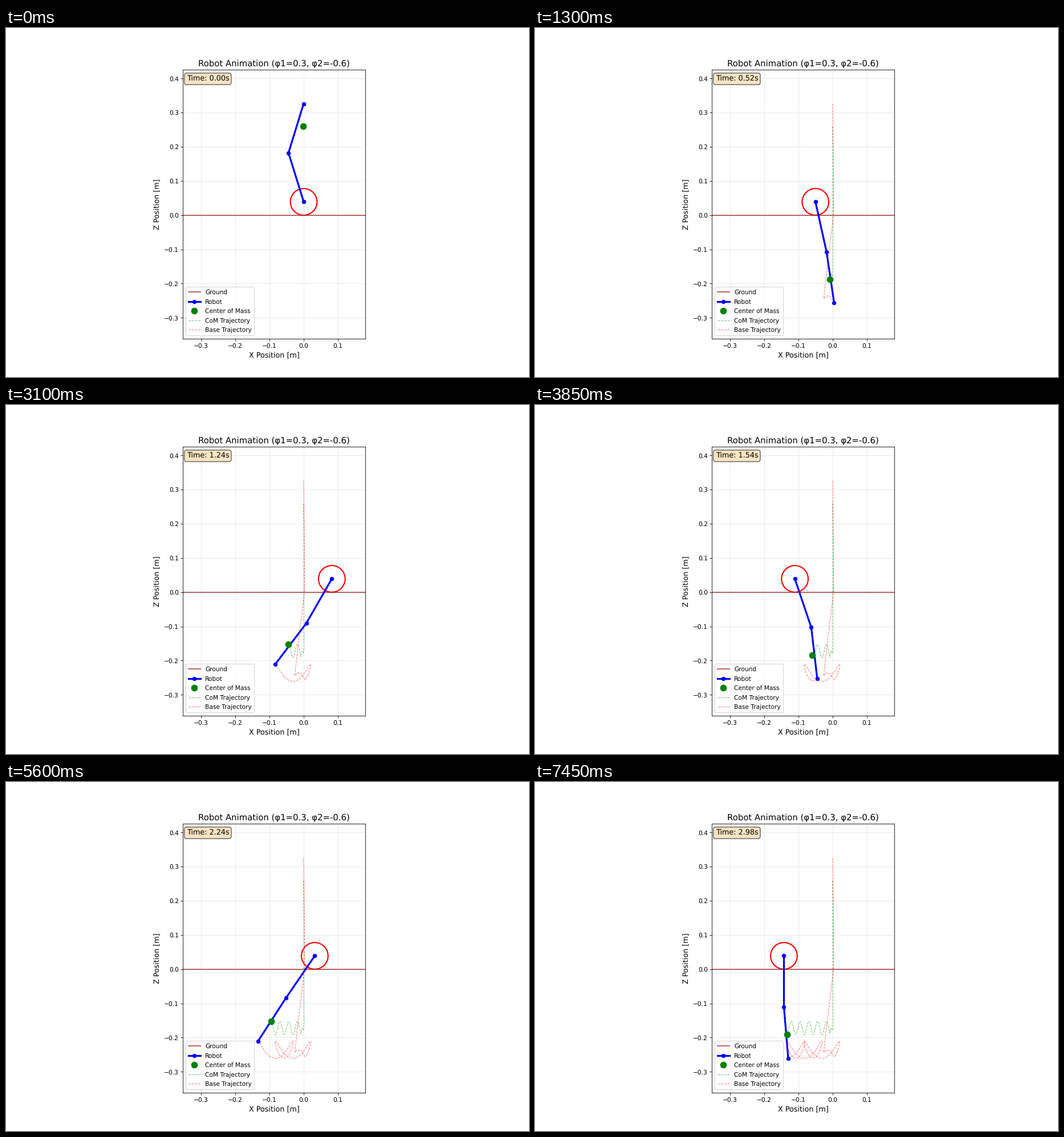
Recreate the animation shown at these times as a matplotlib script. Size 917 by 611 pixels, loop 7.5 s.

```python
import numpy as np
import matplotlib.pyplot as plt
from matplotlib.animation import FuncAnimation

plt.rcParams['text.hinting'] = 'none'

DPI = 611 / 8
N, DT = 150, 0.02
LINK, RADIUS = 0.15, 0.039
W_WHEEL, W_KNEE, W_BASE = 0.22, 0.02, 0.76   # mass shares
T_TAUT, T_WHIP, T_SWING = 0.34, 0.38, 0.52   # legs taut, knee flips, steady swing
DRIFT = -0.0508


def com_x(t):
    if t < T_TAUT:
        return -0.0008 + 0.002 * t / T_TAUT
    return 0.0012 + DRIFT * (t - T_TAUT)


def fall_base(t):
    """Base drops past the wheel, then rebounds as the legs go taut."""
    if t <= T_TAUT:
        z = 0.3256 - 0.5 * 9.48 * t * t
        x = np.interp(z, [-0.2226, -0.112, 0, 0.164, 0.3256],
                      [-0.0235, -0.011, 0.003, 0.003, 0])
        return np.array([x, z])
    keys = [T_TAUT, T_WHIP, 0.42, 0.46, T_SWING]
    x = np.interp(t, keys, [-0.0235, -0.0262, -0.018, -0.0075, 0.0035])
    z = np.interp(t, keys, [-0.2226, -0.244, -0.2365, -0.2365, -0.2567])
    return np.array([x, z])


def knee_between(wheel, base, side):
    """Knee of two equal links, bulging left (side -1) or right (side 1)."""
    dx, dz = base - wheel
    dist = max(np.hypot(dx, dz), 1e-6)
    bulge = np.sqrt(max(LINK ** 2 - dist ** 2 / 4, 0))
    normal = np.array([-dz, dx]) / dist
    if normal[0] * side < 0:
        normal = -normal
    return (wheel + base) / 2 + bulge * normal


def fall_pose(t):
    base = fall_base(t)
    side = -1 if t < T_WHIP - 1e-9 else 1
    wheel = np.array([0.0, RADIUS])
    for _ in range(30):
        knee = knee_between(wheel, base, side)
        wheel[0] = (com_x(t) - W_BASE * base[0] - W_KNEE * knee[0]) / W_WHEEL
    return wheel, knee, base


def swing_pose(t):
    theta = 0.588 * np.cos(6.2275 * (t - 0.7214))
    bend = np.interp(t, [0.52, 0.92, 1.54, 1.96, 2.52, 2.98],
                     [-0.035, -0.02, -0.105, -0.015, 0.04, 0.042])
    a, b = theta - bend, theta + bend
    knee = LINK * np.array([np.sin(a), -np.cos(a)])
    base = knee + LINK * np.array([np.sin(b), -np.cos(b)])
    wheel = np.array([com_x(t) - W_KNEE * knee[0] - W_BASE * base[0], RADIUS])
    return wheel, wheel + knee, wheel + base


def pose(t):
    return fall_pose(t) if t < T_SWING - 1e-9 else swing_pose(t)


joints = np.array([pose(i * DT) for i in range(N)])
com = np.einsum('j,ijk->ik', [W_WHEEL, W_KNEE, W_BASE], joints)
base_path = joints[:, 2]

fig, ax = plt.subplots(figsize=(7336 / 611, 8), dpi=DPI)
ax.set_xlim(-0.3535, 0.1805)
ax.set_ylim(-0.361, 0.425)
ax.set_aspect('equal')
ax.grid(True, alpha=0.3)
ax.set_xlabel('X Position [m]', fontsize=12, labelpad=5)
ax.set_ylabel('Z Position [m]', fontsize=12, labelpad=5)
ax.set_title('Robot Animation (φ1=0.3, φ2=-0.6)', fontsize=14)

ax.axhline(0, color='brown', lw=2, alpha=0.7, label='Ground')
robot, = ax.plot([], [], 'bo-', lw=3, ms=6, label='Robot')
mass, = ax.plot([], [], 'go', ms=10, label='Center of Mass')
com_trail, = ax.plot([], [], 'g--', lw=1, alpha=0.5, label='CoM Trajectory')
base_trail, = ax.plot([], [], 'r--', lw=1, alpha=0.5, label='Base Trajectory')
rim = plt.Circle((0, RADIUS), RADIUS, fill=False, color='red', lw=2)
ax.add_patch(rim)
clock = ax.text(0.02, 0.98, '', transform=ax.transAxes, fontsize=12, va='top',
                bbox=dict(boxstyle='round', facecolor='wheat', alpha=0.8))
ax.legend(loc='lower left', fontsize=10, labelspacing=0.55)


def draw(i):
    robot.set_data(*joints[i].T)
    mass.set_data(*com[i:i + 1].T)
    com_trail.set_data(*com[:i + 1].T)
    base_trail.set_data(*base_path[:i + 1].T)
    rim.center = joints[i, 0]
    clock.set_text(f'Time: {i * DT:.2f}s')
    return robot, mass, com_trail, base_trail, rim, clock


anim = FuncAnimation(fig, draw, frames=N, init_func=lambda: draw(0),
                     interval=50, repeat=True, repeat_delay=0)
plt.show()
```
